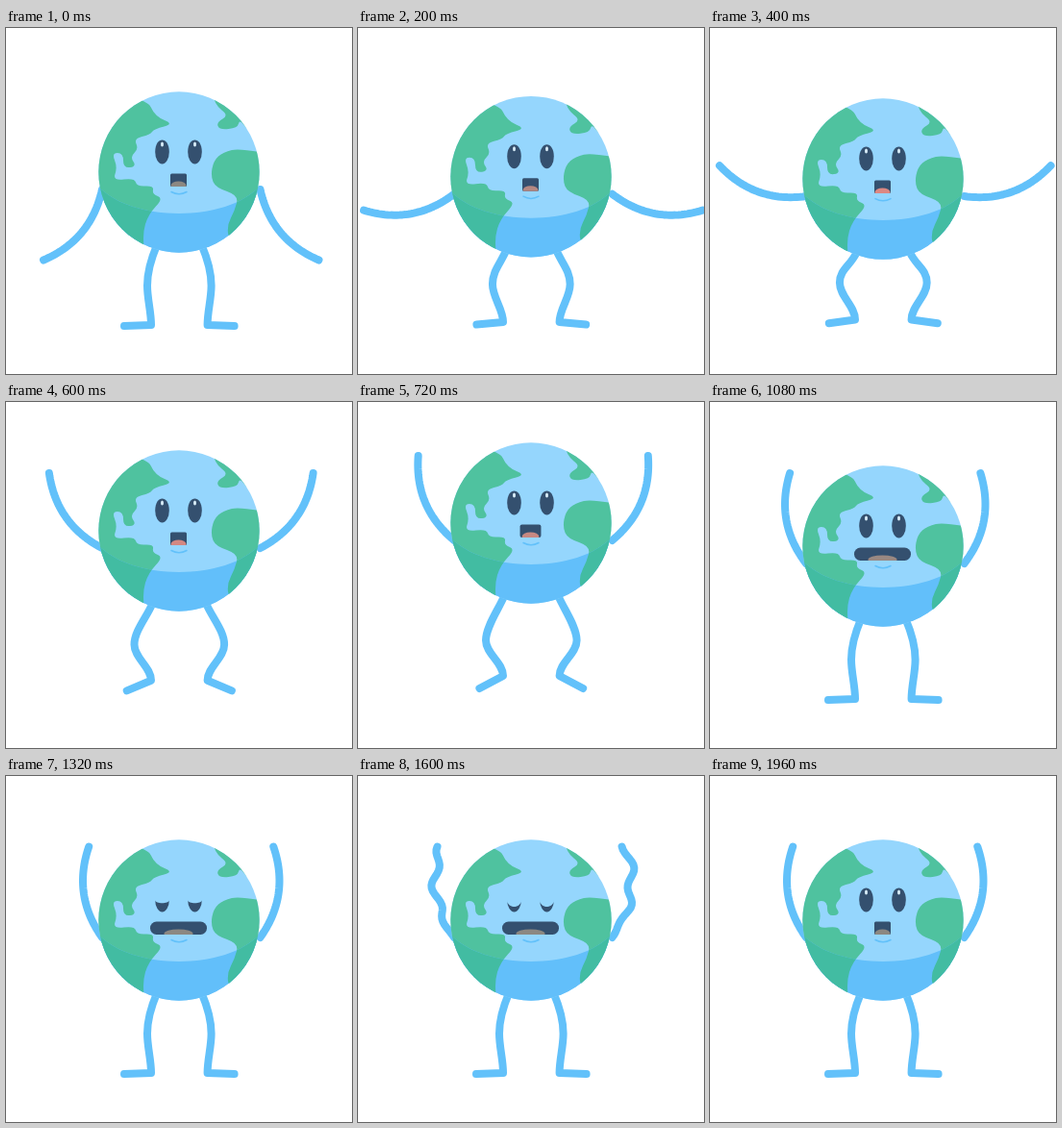
An HTML page with a canvas that plays this animation: 360x360 px, repeating every 2 s.

```html
<!DOCTYPE html>
<html lang="en">
<head>
<meta charset="utf-8">
<title>Cheering globe</title>
<style>
html, body { margin: 0; width: 100%; height: 100%; overflow: hidden; background: #fff; }
canvas { display: block; }
</style>
</head>
<body>
<canvas id="stage" width="360" height="360"></canvas>
<script>
const ctx = document.getElementById('stage').getContext('2d');
const LOOP = 2000, STEP = 40;
const LIMB = '#62c1fa', INK = '#34506f';
const LIGHT = { sea: '#95d6fd', land: '#4fc29f' };
const SHADE = { sea: '#62bffa', land: '#42bca2' };

// Closed outline, rounded through the midpoints of the given points
function smooth(...p) {
  const path = new Path2D();
  path.moveTo(p[0], p[1]);
  for (let i = 2; i < p.length - 2; i += 2)
    path.quadraticCurveTo(p[i], p[i + 1], (p[i] + p[i + 2]) / 2, (p[i + 1] + p[i + 3]) / 2);
  path.lineTo(p[p.length - 2], p[p.length - 1]);
  path.closePath();
  return path;
}

// Key points of the coasts; the globe's edge clips the rest
const lands = [
  smooth(80, 60, 146, 72, 155, 92, 175, 100, 154, 105, 150, 111, 133, 115, 138, 126, 129, 134,
    136, 144, 122, 146, 122, 130, 110, 130, 116, 145, 111, 159, 134, 156, 136, 165, 154, 164,
    152, 173, 164, 177, 148, 194, 142, 214, 145, 240, 80, 240),
  smooth(214, 66, 217, 80, 232, 91, 219, 98, 222, 106, 241, 104, 243, 95, 252, 107, 270, 112, 270, 80),
  smooth(275, 131, 244, 125, 226, 129, 216, 138, 213, 154, 218, 166, 242, 174, 238, 190, 230, 205,
    232, 222, 275, 222)
];

const ball = new Path2D();
ball.arc(180, 150, 83.7, 0, 7);
const shadow = new Path2D('M90 157C120 205 240 205 270 157V240H90Z');

// Eased value from [time, value] keys
function track(t, ...keys) {
  if (t <= keys[0][0]) return keys[0][1];
  for (let i = 1; i < keys.length; i++) {
    const [t0, a] = keys[i - 1], [t1, b] = keys[i];
    if (t < t1) return a + (b - a) * (1 - Math.cos(Math.PI * (t - t0) / (t1 - t0))) / 2;
  }
  return keys[keys.length - 1][1];
}

// Value at rest, in the crouch, at the top of the jump and at rest again
const jump = (t, rest, crouch, top) =>
  track(t, [0, rest], [360, crouch], [720, top], [1010, rest]);

function mirrored(axis, draw) {
  draw();
  ctx.save();
  ctx.translate(2 * axis, 0);
  ctx.scale(-1, 1);
  draw();
  ctx.restore();
}

function drawLegs(t, dy) {
  const lift = jump(t, 0, 5, 24);
  const kx = jump(t, 147, 135, 133), ky = jump(t, 268, 265.5, 248);
  const ax = 151, ay = 309 - lift;
  const hip = 157 - (147 - kx) * 0.35;
  mirrored(180.3, () => {
    ctx.beginPath();
    ctx.moveTo(hip, 226 + dy);
    ctx.bezierCurveTo(hip - 6, 240 + dy, kx, ky - 14, kx, ky);
    ctx.bezierCurveTo(kx, ky + 14, ax, ay - 14, ax, ay);
    ctx.lineTo(123 + lift / 7, 310 - lift / 2);
    ctx.stroke();
  });
}

// A bowed arm turns about the shoulder; a ripple runs along it near the end
function drawArm(t, dy, right) {
  const a = track(t, [0, 39.7], [360, 108], [720, 157], [1190, 171.7]) * Math.PI / 180;
  const sway = t > 1360 && t < 1920 ? 4 * Math.sin(Math.PI * (t - 1360) / 560) ** 2 : 0;
  const sin = Math.sin(a), cos = Math.cos(a);
  ctx.beginPath();
  for (let u = 0; u <= 1; u += 1 / 32) {
    const along = 95.5 * u, bow = 49 * u * (1 - u);
    const x = 100 - along * sin + bow * cos;
    const y = 168 + dy + along * cos + bow * sin;
    const wave = sway * Math.min(1, 3 * u) * Math.sin(2 * Math.PI * ((y - 85) / 40 - (t - 1600) / 280));
    ctx.lineTo((right ? 364.5 - x : x) + wave, y);
  }
  ctx.stroke();
}

function paintGlobe({ sea, land }) {
  ctx.fillStyle = sea;
  ctx.fillRect(90, 60, 180, 180);
  ctx.fillStyle = land;
  lands.forEach(path => ctx.fill(path));
}

function drawGlobe() {
  ctx.save();
  ctx.clip(ball);
  paintGlobe(LIGHT);
  ctx.clip(shadow);
  paintGlobe(SHADE);
  ctx.restore();
}

// The upper lid is a curve whose height sinks from above the eye to below its middle
function drawEye(x, lid) {
  ctx.fillStyle = INK;
  ctx.beginPath();
  ctx.ellipse(x, 129, 7.3, 12.5, 0, Math.PI, 0, true);
  ctx.bezierCurveTo(x + 7.3, 129 + lid * 4 / 3, x - 7.3, 129 + lid * 4 / 3, x - 7.3, 129);
  ctx.fill();
  if (lid > -9) return;
  ctx.fillStyle = '#d9edf8';
  ctx.beginPath();
  ctx.ellipse(x, 121, 1.5, 2.5, 0, 0, 7);
  ctx.fill();
}

function drawMouth(t) {
  const wide = track(t, [640, 0], [1000, 1], [1680, 1], [1920, 0]);
  const warm = track(t, [0, 0], [400, 1], [1320, 0]);
  const half = 8.5 + 21 * wide;
  ctx.save();
  ctx.fillStyle = INK;
  ctx.beginPath();
  ctx.roundRect(179.5 - half, 151.5, 2 * half, 13.5, 1.5 + 5 * wide);
  ctx.fill();
  ctx.clip();
  ctx.fillStyle = `rgb(${140 + 80 * warm}, 136, 130)`;
  ctx.beginPath();
  ctx.ellipse(179.5, 164, 8 + 7 * wide, 4.5, 0, 0, 7);
  ctx.fill();
  ctx.restore();
  ctx.strokeStyle = LIMB;
  ctx.lineWidth = 1.5;
  ctx.beginPath();
  ctx.moveTo(172, 170.5);
  ctx.quadraticCurveTo(180, 175, 188, 170.5);
  ctx.stroke();
}

function draw(t) {
  const dy = jump(t, 0, 8, -24);
  const lid = track(t, [1120, -12.5], [1400, 7], [1720, 7], [1900, -12.5]);
  ctx.fillStyle = '#fff';
  ctx.fillRect(0, 0, 360, 360);
  ctx.strokeStyle = LIMB;
  ctx.lineWidth = 8;
  ctx.lineCap = ctx.lineJoin = 'round';
  drawLegs(t, dy);
  drawArm(t, dy, false);
  drawArm(t, dy, true);
  ctx.save();
  ctx.translate(0, dy);
  drawGlobe();
  drawEye(162.5, lid);
  drawEye(196.5, lid);
  drawMouth(t);
  ctx.restore();
}

const start = performance.now();
function tick() {
  const t = (performance.now() - start) % LOOP;
  draw(Math.floor(t / STEP) * STEP);
  requestAnimationFrame(tick);
}
tick();
</script>
</body>
</html>
```
